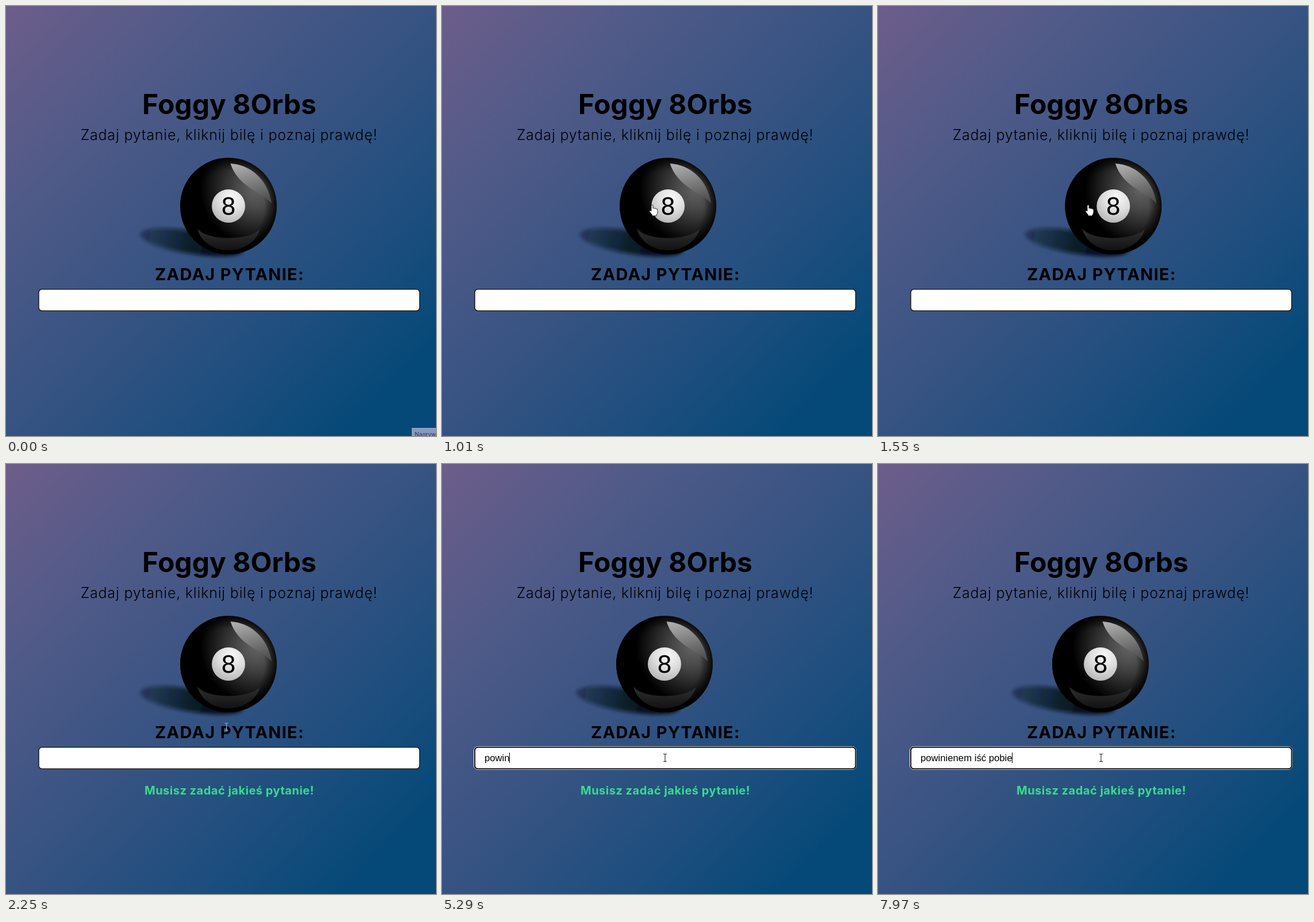
An HTML page that plays this animation: 748 px wide and 748 px high, repeating every 8 s.

```html
<!DOCTYPE html>
<html lang="pl">
<head>
<meta charset="utf-8">
<title>Foggy 8Orbs</title>
<style>
  html, body { margin: 0; width: 100%; height: 100%; overflow: hidden; }
  body { background: linear-gradient(135deg, #6d5d8a 0%, #505a88 24%, #365382 50%, #1c4e7e 72%, #054978 89%); }
  svg { display: block; width: 748px; height: 748px; }
  text { font-family: Inter, "Open Sans", sans-serif; }
  .mid { text-anchor: middle; }
  #typed { font: 16.7px "Liberation Sans", Arial, sans-serif; white-space: pre; }
</style>
</head>
<body>
<svg viewBox="0 0 748 748">
  <defs>
    <radialGradient id="glow" gradientUnits="userSpaceOnUse" cx="436" cy="318" r="98">
      <stop offset="0" stop-color="#646464"/>
      <stop offset=".35" stop-color="#484848"/>
      <stop offset=".7" stop-color="#222"/>
      <stop offset="1" stop-color="#000"/>
    </radialGradient>
    <radialGradient id="rim" gradientUnits="userSpaceOnUse" cx="387" cy="348" r="84">
      <stop offset=".74" stop-opacity="0"/>
      <stop offset="1" stop-opacity=".85"/>
    </radialGradient>
    <linearGradient id="shine" x1=".3" y1="0" x2=".6" y2="1">
      <stop offset="0" stop-color="#acacac"/>
      <stop offset="1" stop-color="#505050"/>
    </linearGradient>
    <linearGradient id="bounce" x1="0" y1="0" x2="0" y2="1">
      <stop offset="0" stop-color="#303030"/>
      <stop offset="1" stop-color="#121212"/>
    </linearGradient>
    <radialGradient id="disc" cx=".6" cy=".25" r=".8">
      <stop offset="0" stop-color="#f8f8f8"/>
      <stop offset=".5" stop-color="#dedede"/>
      <stop offset="1" stop-color="#b4b4b4"/>
    </radialGradient>
    <linearGradient id="fade">
      <stop offset="0" stop-color="#0a1020" stop-opacity=".35"/>
      <stop offset=".5" stop-color="#060a14" stop-opacity=".8"/>
      <stop offset="1" stop-color="#000" stop-opacity=".9"/>
    </linearGradient>
    <filter id="soft" x="-20%" y="-50%" width="140%" height="200%">
      <feGaussianBlur stdDeviation="3"/>
    </filter>
  </defs>

  <text class="mid" x="388.500" y="188" font-size="48" font-weight="700">Foggy 8Orbs</text>
  <text class="mid" x="388" y="233" font-size="25" font-weight="300" letter-spacing=".8">Zadaj pytanie, kliknij bilę i poznaj prawdę!</text>

  <g id="ball">
    <ellipse cx="323" cy="411" rx="91" ry="20" transform="rotate(9 323 411)" fill="url(#fade)" filter="url(#soft)"/>
    <circle cx="387" cy="348" r="84" fill="url(#glow)"/>
    <circle cx="387" cy="348" r="84" fill="url(#rim)"/>
    <path d="M390.500 274C424 276 455 300 462 343C444 324 403 314 390.500 274Z" fill="url(#shine)"/>
    <path d="M333 387C348 409 426 409 442 387C437 409 414 425 387 425C360 425 338 409 333 387Z" fill="url(#bounce)"/>
    <circle cx="387" cy="348" r="29" fill="url(#disc)"/>
    <text class="mid" x="387" y="363" style="font:41px 'DejaVu Sans',sans-serif">8</text>
  </g>

  <text class="mid" x="389" y="476.500" font-size="29" font-weight="700" letter-spacing="1.250">ZADAJ PYTANIE:</text>

  <rect id="ring" x="55.500" y="491.500" width="665" height="40" rx="7" fill="none" stroke="#fff"/>
  <rect id="field" x="57" y="492.750" width="662.500" height="37.500" rx="5.500" fill="#fff" stroke="#1c1c1c"/>
  <text id="typed" x="74" y="517"></text>
  <rect id="caret" y="502" width="1" height="18"/>

  <text id="warn" class="mid" x="388.500" y="575" font-size="20" font-weight="700" letter-spacing=".5" fill="#34df8b">Musisz zadać jakieś pytanie!</text>

  <g id="tip">
    <rect x="706.500" y="734.500" width="60" height="30" fill="#8799bd" stroke="#a3b1cc"/>
    <text x="711" y="749" font-size="10" fill="#1f3566">Nagrywanie</text>
  </g>

  <g id="cursor">
    <circle id="click" r="10.500" fill="#e2e22c" opacity=".8"/>
    <path id="arrow" d="M0 0V16L3.700 12.500L6.300 18.300L8.800 17.200L6.200 11.600H11.300Z" fill="#fff" stroke="#000" stroke-width=".9"/>
    <path id="hand" d="M-1.500 .8Q0 -1.200 1.500 .8V6Q3 4.800 4.300 6.400Q5.800 5.400 7 7Q9.200 6.300 9.500 8.800V13Q9 16 7.500 17.500V19H0V17.500L-4.400 11.500Q-5 9.500 -3 9.700L-1.500 11Z" fill="#fff" stroke="#111" stroke-width=".9"/>
    <path id="beam" d="M-3 -6.500H-1Q0 -6.500 0 -5.500V5.500Q0 6.500 -1 6.500H-3M3 -6.500H1Q0 -6.500 0 -5.500M0 5.500Q0 6.500 1 6.500H3" fill="none" stroke-width="1.100"/>
  </g>
</svg>
<script>
  const LOOP = 8000;
  const PHRASE = 'powinienem iść pobie';
  const KEYS = [3980, 4150, 4320, 4450, 5290, 5420, 5630, 5740, 5850, 5960,
    6070, 6240, 6540, 6740, 6980, 7260, 7460, 7700, 7830, 7970];
  const PATH = [[60, 752, 752], [300, 520, 500], [480, 395, 375], [600, 365.5, 346],
    [1690, 365.5, 346], [1790, 367, 351], [2030, 367, 351], [2250, 383.5, 457],
    [2400, 386.5, 498], [2600, 388, 511]];
  const FOCUS = 2860, BLINK = 540;
  const SHAKE = { from: 860, peak: 1400, to: 1780, reach: 34 };

  const el = {};
  document.querySelectorAll('svg [id]').forEach(n => el[n.id] = n);
  const show = (node, on) => node.setAttribute('visibility', on ? 'visible' : 'hidden');
  const within = (t, a, b) => t >= a && t < b;
  const wave = u => (1 - Math.cos(Math.PI * Math.min(1, Math.max(0, u)))) / 2;

  function pointer(t) {
    const i = PATH.findIndex(p => p[0] > t);
    if (i === 0) return PATH[0].slice(1);
    if (i < 0) return PATH[PATH.length - 1].slice(1);
    const [a, b] = [PATH[i - 1], PATH[i]];
    const u = (t - a[0]) / (b[0] - a[0]);
    return [a[1] + (b[1] - a[1]) * u, a[2] + (b[2] - a[2]) * u];
  }

  function shift(t) {
    const { from, peak, to, reach } = SHAKE;
    return reach * (t < peak ? wave((t - from) / (peak - from)) : wave((to - t) / (to - peak)));
  }

  function drawField(t) {
    const focused = t >= FOCUS;
    show(el.ring, focused);
    el.field.setAttribute('stroke-width', focused ? 2 : 1.5);
    el.field.setAttribute('stroke', focused ? '#101010' : '#1c1c1c');

    const count = KEYS.filter(k => k <= t).length;
    const text = PHRASE.slice(0, count);
    if (el.typed.textContent !== text) el.typed.textContent = text;
    const since = t - (count ? KEYS[count - 1] : FOCUS);
    show(el.caret, focused && Math.floor(since / BLINK) % 2 === 0);
    el.caret.setAttribute('x', 74 + Math.floor(count ? el.typed.getComputedTextLength() : 0));
  }

  function drawCursor(t, dx) {
    const [x, y] = pointer(t);
    const alive = t >= PATH[0][0];
    const onBall = Math.hypot(x - 387 - dx, y - 348) < 84;
    const onText = !onBall && within(y, 440, 532);
    el.cursor.setAttribute('transform', `translate(${x} ${y})`);
    show(el.hand, alive && onBall);
    show(el.beam, alive && onText);
    show(el.arrow, alive && !onBall && !onText);
    el.beam.setAttribute('stroke', y > 492 ? '#222' : '#9fb2cf');
    show(el.click, within(t, 620, 760) || within(t, FOCUS, 2970));
  }

  function draw(t) {
    const dx = shift(t);
    el.ball.setAttribute('transform', `translate(${dx} 0)`);
    show(el.tip, t < 60);
    show(el.warn, t >= 1760);
    drawField(t);
    drawCursor(t, dx);
  }

  function tick() {
    draw(performance.now() % LOOP);
    requestAnimationFrame(tick);
  }
  tick();
</script>
</body>
</html>
```
